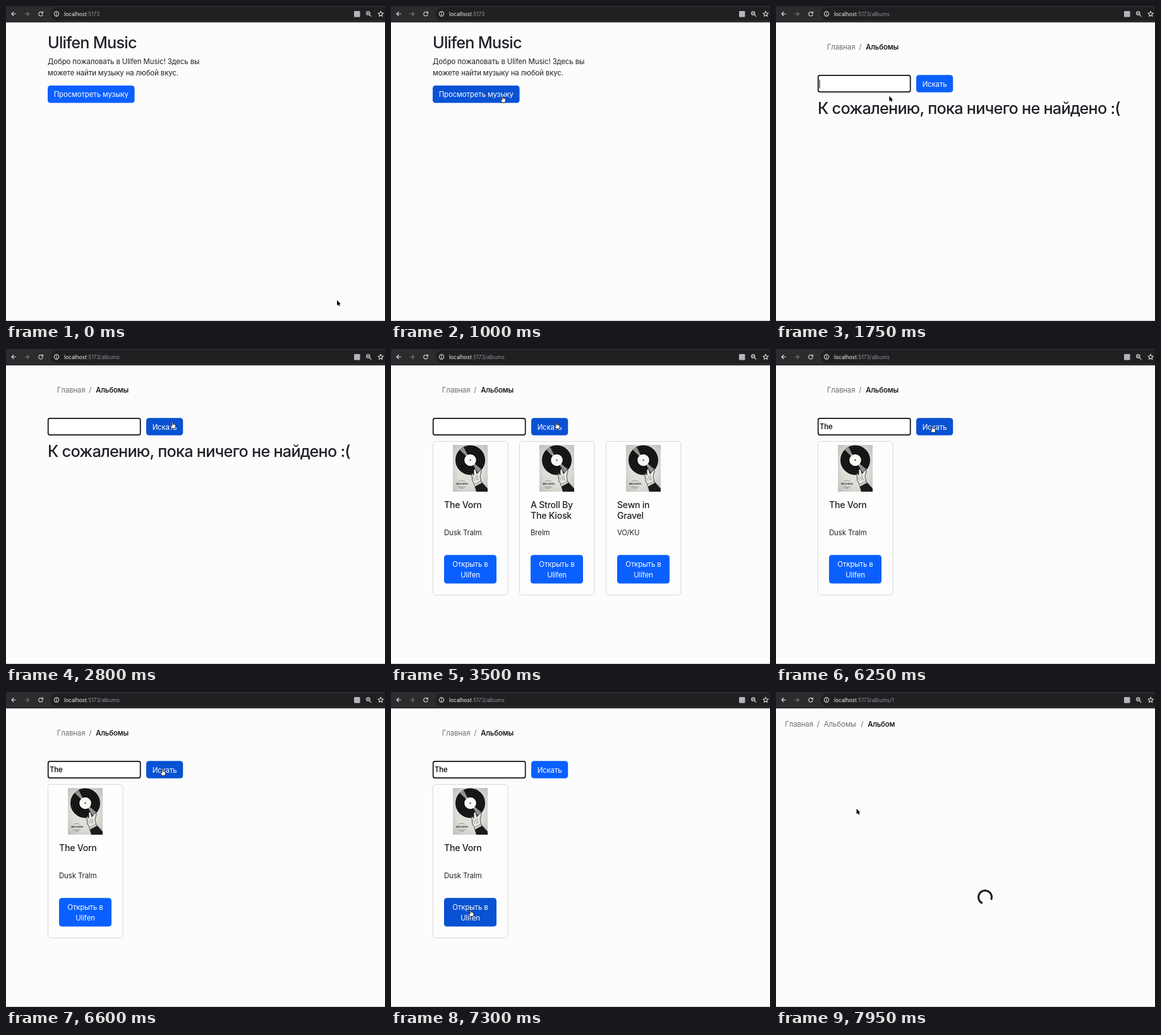
Animation of 600 by 499 pixels, one loop 8000 ms. Source, as an HTML page:

```html
<!DOCTYPE html>
<html lang="ru">
<head>
<meta charset="utf-8">
<title>Ulifen Music</title>
<style>
  html, body { margin: 0; width: 100%; height: 100%; overflow: hidden; background: #fcfcfd; }
  svg { display: block; width: 100vw; height: 100vh; }
  text { font: 400 11.4px Inter, "Open Sans", sans-serif; letter-spacing: -.1px; fill: #1f2226; white-space: pre; }
  .h1 { font-size: 25.2px; font-weight: 500; letter-spacing: -.73px; }
  .h5 { font-size: 14.1px; font-weight: 500; letter-spacing: -.25px; }
  .muted { fill: #6c6e72; }
  .current { fill: #000; font-weight: 450; }
  .btn rect { fill: #0a60ff; }
  .btn.hover rect { fill: #0852d3; }
  .btn text { fill: #fff; text-anchor: middle; }
  .url { font-size: 8.4px; letter-spacing: 0; fill: #8f9194; }
  .icon { fill: none; stroke: #dcdddf; stroke-width: 1.1; stroke-linecap: round; stroke-linejoin: round; }
  .cursor { stroke: #fff; stroke-width: .8; paint-order: stroke; }
</style>
</head>
<body>
<svg viewBox="0 0 600 499" preserveAspectRatio="none">
  <defs>
    <radialGradient id="paper" r=".75">
      <stop offset=".5" stop-color="#dedfd9"/><stop offset="1" stop-color="#b9bab3"/>
    </radialGradient>
    <clipPath id="frame"><path d="M0 0H55V74H0z"/></clipPath>
    <g id="cover" clip-path="url(#frame)">
      <path d="M0 0H55V74H0z" fill="url(#paper)"/>
      <circle cx="27.5" cy="24" r="23.5" fill="#111"/>
      <path d="M27.5 24L11 8A23 23 0 0 1 17 3.5zM27.5 24L45 38.5A23 23 0 0 1 39 43.5z" fill="#9b9c9a"/>
      <g fill="none" stroke="#3c3c3c" stroke-width=".5">
        <circle cx="27.5" cy="24" r="20.5"/><circle cx="27.5" cy="24" r="17"/><circle cx="27.5" cy="24" r="13.5"/>
      </g>
      <circle cx="27.5" cy="24" r="9.3" fill="#f7f7f4"/>
      <circle cx="27.5" cy="24" r="1.1" fill="#111"/>
      <path d="M33 39q2-2 3.5 1l1.5 6 5-6q2-1 2 2l-2 8 2 9-10 5-4-7-1-9q-1-3 1-3l2 3z" fill="#e9e9e4" stroke="#222" stroke-width=".8"/>
      <path d="M35 49l3 7M38 48l2 8M32 51l3 6" stroke="#555" stroke-width=".6"/>
      <path d="M34 64l11-6 10 11v5H37z" fill="#1b1b1b"/>
      <path d="M33 63l11-6 2 3-11 6z" fill="#d5d5cf" stroke="#333" stroke-width=".5"/>
      <text x="5" y="63.4" style="font:700 3.6px 'Noto Serif',serif;letter-spacing:-.1px">MELODIES.</text>
      <path d="M9 57.5q5-3 10 0M8 66.5h12M11 68.5h6" fill="none" stroke="#777" stroke-width=".7"/>
    </g>
  </defs>

  <path d="M0 0H600V499H0z" fill="#fcfcfd"/>
  <path d="M0 498.5H600" stroke="#c9c9ca"/>

  <path d="M0 0H600V26H0z" fill="#2b2c2e"/>
  <path d="M600 2H81a10.5 10.5 0 0 0 0 21H600z" fill="#1f2022"/>
  <g class="icon">
    <path d="M15.5 12.5H9M12 9.5L9 12.5l3 3"/>
    <path d="M30 12.5h6.5M33.5 9.5l3 3-3 3" stroke="#77787b"/>
    <path d="M57.6 10.6A3.3 3.3 0 1 0 58.2 13.4M58.4 8.9v2.2h-2.2"/>
    <circle cx="80" cy="12.5" r="3.6"/><path d="M80 12.3v2M80 10.6v.1"/>
    <circle cx="573.3" cy="11.6" r="2.7"/><path d="M575.4 13.7l2.6 2.6M572.2 11.6h2.2"/>
    <path d="M593.2 8.2l1.2 2.8 3 .3-2.3 2 .7 3-2.6-1.6-2.6 1.6.7-3-2.3-2 3-.3z"/>
  </g>
  <rect x="551" y="8" width="9.5" height="9.5" rx="1.2" fill="#b4b5b8"/>
  <text class="url" x="92" y="15.5"><tspan fill="#f1f1f2">localhost</tspan>:5173<tspan id="path"></tspan></text>

  <g id="home"></g>
  <g id="albums"></g>
  <g id="album"></g>
  <path id="spinner" d="M7.42 7.42A10.5 10.5 0 1 1 7.42 -7.42" fill="none" stroke="#1c1f23" stroke-width="3"/>
  <g id="cursor">
    <path id="arrow" class="cursor" d="M0 0V8.4L1.9 6.7 3.2 9.6 4.7 8.9 3.4 6.2H6z"/>
    <path id="hand" d="M-.9.8Q0-.7.9.8V4L2 3.7 3 4.2 4 4.2 5 5V7.6L4 10.5H-.6L-3.2 6.6Q-3.2 5.2-2 5.8L-.9 6.9z" fill="#fff" stroke="#111" stroke-width=".9" stroke-linejoin="round"/>
    <path id="beam" d="M-1.5-5Q0-5 0-4V4Q0 5-1.5 5M1.5-5Q0-5 0-4V4Q0 5 1.5 5" fill="none" stroke="#222" stroke-width=".9"/>
  </g>
</svg>
<script>
const LOOP = 8000;
const $ = id => document.getElementById(id);
const show = (el, on) => { el.style.display = on ? '' : 'none'; };
const between = (t, a, b) => t >= a && t < b;

const label = (x, y, str, cls = '') => `<text x="${x}" y="${y}" class="${cls}">${str}</text>`;
const button = (id, x, y, w, h, ...lines) =>
  `<g class="btn" id="${id}"><rect x="${x}" y="${y}" width="${w}" height="${h}" rx="4.4"/>` +
  lines.map((line, i) => label(x + w / 2, y + 18.3 + i * 17.6, line)).join('') + '</g>';

const card = ([title, subtitle, artist], i) => {
  const x = 66 + i * 137;
  return `<g id="card${i}">
    <rect x="${x + .4}" y="146.4" width="118.6" height="243.2" rx="4.4" fill="#fdfdfe" stroke="#d6d7d9"/>
    <use href="#cover" x="${x + 32}" y="152"/>
    ${label(x + 18, 251.7, title, 'h5')}${label(x + 18, 269.3, subtitle, 'h5')}
    ${label(x + 18, 295.2, artist)}
    ${button('open' + i, x + 18, 326.3, 83, 45.3, 'Открыть в', 'Ulifen')}</g>`;
};

const records = [
  ['The Vorn', '', 'Dusk Tralm'],
  ['A Stroll By', 'The Kiosk', 'Brelm'],
  ['Sewn in', 'Gravel', 'VO/KU'],
];

$('home').innerHTML =
  label(66, 66.5, 'Ulifen Music', 'h1') +
  label(66, 92, 'Добро пожаловать в Ulifen Music! Здесь вы') +
  label(66, 109.6, 'можете найти музыку на любой вкус.') +
  button('browse', 66, 126, 137.5, 27.6, 'Просмотреть музыку');

$('albums').innerHTML =
  label(80.7, 69.3, 'Главная', 'muted') + label(131.3, 69.3, '/', 'muted') +
  label(142.3, 69.3, 'Альбомы', 'current') +
  `<rect id="field" x="66.7" y="109.9" width="146" height="26.2" rx="2.8" fill="#fff" stroke="#101010" stroke-width="1.7"/>` +
  label(69, 127.4, '', 'current') +
  '<path id="caret" d="M.5 116.5V130.5" stroke="#000"/>' +
  button('search', 222, 109.2, 58.2, 27.6, 'Искать') +
  `<g id="empty">${label(66, 171.2, 'К сожалению, пока ничего не найдено :(', 'h1')}</g>` +
  records.map(card).join('');

$('album').innerHTML =
  label(14.2, 54.5, 'Главная', 'muted') + label(64.8, 54.5, '/', 'muted') +
  label(75.8, 54.5, 'Альбомы', 'muted') + label(134.3, 54.5, '/', 'muted') +
  label(145.2, 54.5, 'Альбом', 'current');

const typed = $('field').nextElementSibling;

// Pointer stops: time, x, y
const stops = [
  [50, 524, 466], [620, 196, 90], [850, 176.5, 142.5], [1700, 176.5, 142.5],
  [2150, 253, 141], [2400, 253, 141], [2700, 263.5, 115.5], [3100, 263.5, 115.5],
  [3400, 262, 116], [4100, 262, 116], [4450, 150, 123], [5400, 150, 123],
  [5750, 247.5, 122], [6650, 247.5, 122], [7250, 126, 345], [7620, 126, 345], [7900, 127.5, 185],
];

function pointer(t) {
  const next = stops.findIndex(s => s[0] > t);
  if (next <= 0) return stops[next ? stops.length - 1 : 0].slice(1);
  const [t0, x0, y0] = stops[next - 1], [t1, x1, y1] = stops[next];
  const p = (t - t0) / (t1 - t0), k = p * p * (3 - 2 * p);
  return [x0 + (x1 - x0) * k, y0 + (y1 - y0) * k];
}

function inside(box, x, y) {
  const v = name => +box.getAttribute(name);
  return between(x, v('x'), v('x') + v('width')) && between(y, v('y'), v('y') + v('height'));
}

function draw(t) {
  const page = t < 1050 ? 'home' : t < 7600 ? 'albums' : 'album';
  for (const id of ['home', 'albums', 'album']) show($(id), id === page);
  $('path').textContent = { home: '', albums: '/albums', album: '/albums/1' }[page];

  const loading = between(t, 1050, 1400) || between(t, 2900, 3250) || between(t, 5900, 6250) || page === 'album';
  show($('spinner'), loading);
  $('spinner').setAttribute('transform',
    `translate(331 ${page === 'album' ? 325 : 281}) rotate(${68 + (t - 7950) * .48})`);

  const shown = loading || t < 3250 ? 0 : t < 5900 ? 3 : 1;
  records.forEach((_, i) => show($('card' + i), i < shown));
  show($('empty'), !loading && t < 2900);

  typed.textContent = 'The'.slice(0, [4850, 5050, 5300].filter(at => t >= at).length);
  show($('caret'), between(t, 1700, 2200) || between(t, 4450, 5750));
  if (page === 'albums') {
    const width = typed.textContent ? typed.getComputedTextLength() : 0;
    $('caret').setAttribute('transform', `translate(${68.5 + width} 0)`);
  }

  const [x, y] = pointer(t);
  const targets = { home: ['browse'], albums: ['search', ...records.slice(0, shown).map((_, i) => 'open' + i)], album: [] }[page];
  let over = false;
  for (const id of targets) {
    const hit = inside($(id).firstChild, x, y);
    $(id).classList.toggle('hover', hit);
    over = over || hit;
  }
  const editing = page === 'albums' && inside($('field'), x, y);
  show($('hand'), over);
  show($('beam'), editing);
  show($('arrow'), !over && !editing);
  show($('cursor'), !between(t, 4850, 5420));
  $('cursor').setAttribute('transform', `translate(${x} ${y})`);
}

const start = performance.now();
function tick() {
  draw((performance.now() - start) % LOOP);
  requestAnimationFrame(tick);
}
tick();
</script>
</body>
</html>
```
